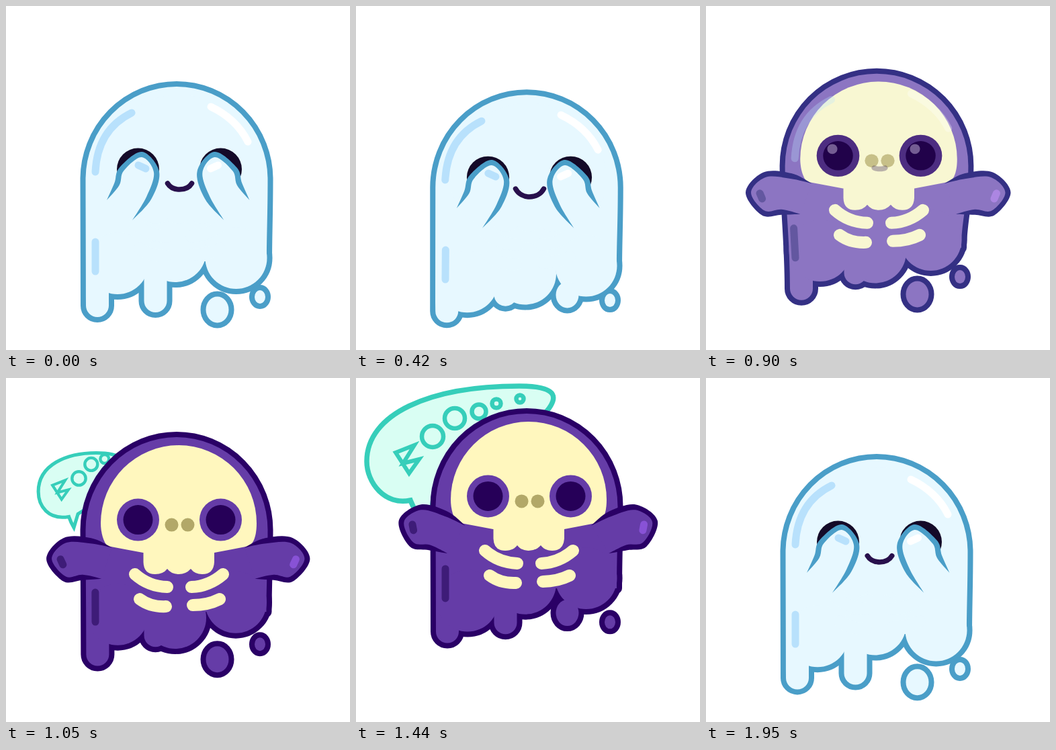
These frames come from a looping animation (512 by 512 pixels, 1980 ms). An HTML page:

```html
<!DOCTYPE html>
<html lang="en">
<head>
<meta charset="utf-8">
<title>Boo</title>
<style>
html, body { margin: 0; width: 100%; height: 100%; overflow: hidden; background: #fff; }
svg { display: block; width: 100vw; height: 100vh; }
</style>
</head>
<body>
<svg viewBox="0 0 512 512" fill="none" stroke-linecap="round">
  <defs>
    <g id="goo">
      <path id="dome"/>
      <circle id="hem1" r="46"/><circle id="hem2" r="46" cx="252"/><circle id="hem3" r="46"/>
      <rect id="leg2" x="205.500" y="350" width="34" rx="17"/>
      <ellipse id="drop1" cx="314.500" rx="17" ry="19.500"/><ellipse id="drop2" cx="378" rx="8" ry="10"/>
    </g>
  </defs>
  <g id="bubble" stroke="#36ceba">
    <path id="balloon" fill="#d9fef3" stroke-width="7.500"/>
    <path id="letterB" stroke-width="6" d="M-20-10L8-21-9 6 15 0 0 21Z"/>
    <g id="letters" stroke-width="6.500"></g>
  </g>
  <g id="ghost">
    <use id="outline" href="#goo" stroke-width="16" stroke-linejoin="round"/>
    <use id="skin" href="#goo"/>
    <path id="bar" stroke-width="11"/>
    <g class="stretch">
      <path class="bone" d="M141 248A116 116 0 0 1 373 248C373 268 368 278 362 282L310 292H204L151 282C145 276 141 262 141 248Z"/>
      <g id="gloss" stroke-width="11">
        <path stroke="#b8e1fc" d="M187 159Q136 184 133 247"/>
        <path stroke="#fff" d="M305 150Q343 168 360 202"/>
      </g>
    </g>
    <path class="bone" d="M310 284V306Q309 324 292 324 281 324 275 316 268 324 257 324 246 324 240 316 234 324 222 324 205 324 204.500 306V284Z"/>
    <path id="ribs" stroke-width="18" d="M192 324Q212 342 240 343M199 361Q215 373 238 372M323 324Q302 342 276 343M318 361Q300 370 278 370"/>
    <g id="face"></g>
    <path id="mouth" stroke="#28104c" stroke-width="7.500"/>
    <g class="stretch" id="arms"></g>
  </g>
</svg>
<script>
const LOOP = 1980;
const NS = "http://www.w3.org/2000/svg";
const $ = id => document.getElementById(id);
const set = (el, attrs) => { for (const k in attrs) el.setAttribute(k, attrs[k]); return el; };
const add = (parent, tag, attrs = {}) => set(parent.appendChild(document.createElementNS(NS, tag)), attrs);
const clamp = x => Math.max(0, Math.min(1, x));
const ramp = (t, a, b) => clamp((t - a) / (b - a));
const smooth = x => x * x * (3 - 2 * x);
const lerp = (a, b, k) => a + (b - a) * k;
const blend = (a, b, k) => a.map((v, i) => lerp(v, b[i], k));
const rgb = (a, b, k) => `rgb(${blend(a, b, k).map(Math.round)})`;

// Smooth pulse that peaks at the given time
const pulse = (t, peak, width) => Math.cos(Math.PI / 2 * Math.min(1, Math.abs(t - peak) / width)) ** 2;
// Wobble with a whole number of cycles per loop
const wave = (t, cycles, mid, amp) => mid + amp * Math.cos(2 * Math.PI * cycles * t / LOOP);

// Smooth curve through a few [time, value] keys, repeating every loop
function track(t, keys) {
  const n = keys.length;
  const key = i => {
    const turn = Math.floor(i / n), [time, value] = keys[i - turn * n];
    return [time + turn * LOOP, value];
  };
  let i = n - 1;
  while (keys[i][0] > t) i--;
  const [a, b, c, d] = [-1, 0, 1, 2].map(k => key(i + k));
  const h = c[0] - b[0], u = (t - b[0]) / h;
  const m0 = (c[1] - a[1]) / (c[0] - a[0]) * h, m1 = (d[1] - b[1]) / (d[0] - b[0]) * h;
  return lerp(b[1], c[1], smooth(u)) + u * (1 - u) * ((1 - u) * m0 - u * m1);
}
const lifts = [[0, 0], [420, 12], [660, 36], [900, -20], [1230, -41], [1440, -67], [1560, -66], [1680, -15], [1950, 1]];

// Cubic segments of a Catmull-Rom spline
function spline(pts, start = "M") {
  const tangent = i => {
    const a = pts[Math.max(0, i - 1)], b = pts[Math.min(pts.length - 1, i + 1)];
    return [(b[0] - a[0]) / 6, (b[1] - a[1]) / 6];
  };
  return start + pts[0] + pts.slice(1).map((q, i) => {
    const p = pts[i], s = tangent(i), e = tangent(i + 1);
    return `C${p[0] + s[0]} ${p[1] + s[1]} ${q[0] - e[0]} ${q[1] - e[1]} ${q}`;
  }).join("");
}

// Shift the inner points sideways, leaving both ends pointed
const offset = (pts, d) => pts.map((p, i) => {
  const a = pts[i - 1], b = pts[i + 1];
  if (!a || !b) return p;
  const dx = b[0] - a[0], dy = b[1] - a[1], len = Math.hypot(dx, dy);
  return [p[0] + dy / len * d, p[1] - dx / len * d];
});

const armHide = [[188, 319], [213, 285], [224, 247], [202, 221], [172, 243], [165, 265], [150, 289]];
const armOut = [[157, 284], [125, 275], [86, 276], [64, 304], [88, 333], [115, 330], [143, 331]];
const shineHide = [[197, 237], [208, 242]], shineOut = [[81, 304], [85, 312]];

const rings = [[114, 99, 16], [147, 72, 15], [183, 62, 10.5], [209, 50, 6.5], [244, 43, 5.5]];
const ringEls = rings.map(() => add($("letters"), "circle"));

const face = $("face");
const oval = (cx, cy, r, attrs) => ({ r, el: add(face, "ellipse", { cx, cy, ...attrs }) });
const sides = [196.5, 319.5];
const rims = sides.map(x => oval(x, 243, 31.5));
const pupils = sides.map(x => oval(x, 243, 22));
const glints = sides.map(x => oval(x - 8.5, 233, 7.5, { fill: "#e9defa" }));
const nostrils = [246.5, 270.5].map(x => oval(x, 250.5, 10, { fill: "#b2a868" }));

const arms = [0, 1].map(right => {
  const g = add($("arms"), "g", right ? { transform: "translate(512.5) scale(-1 1)" } : {});
  return { skin: add(g, "path"), edge: add(g, "path"), shine: add(g, "path", { "stroke-width": 11 }) };
});

function drawBubble(t) {
  const size = ramp(t, 990, 1080) * (1 - ramp(t, 1680, 1740));
  const big = smooth(ramp(t, 1080, 1210)) * (1 - ramp(t, 1620, 1680));
  const up = smooth(ramp(t, 1230, 1440)) * big;
  const mix = (a, b) => lerp(a, b, big);
  $("bubble").style.display = size ? "" : "none";
  set($("bubble"), { transform: `translate(101 224) scale(${size}) translate(-101 -224)` });

  const left = mix(23, 18), top = mix(58, 18), right = mix(212, 305), low = mix(198, 188), mid = mix(143, 130);
  set($("balloon"), {
    transform: `translate(${-2 * up} ${-6 * up})`,
    d: `M${mix(101, 112)} ${mix(222, 226)}Q${mix(94, 91)} 210 ${mix(90, 83)} ${low}
      C45 ${low + 8} ${left} ${mid + 32} ${left} ${mid}
      C${left} ${top + mix(26, 42)} ${mix(85, 110)} ${top} ${mix(150, 245)} ${top}
      C${right} ${top} ${right} ${top + 18} ${mix(211, 280)} ${top + 44}
      Q${mix(180, 225)} 150 ${mix(110, 118)} ${mix(192, 178)}Z`
  });
  set($("letterB"), { transform: `translate(${mix(74, 66) + 13 * up} ${mix(139, 127) - 6 * up})` });
  rings.forEach(([x, y, r], i) => set(ringEls[i], {
    cx: mix(112 + (x - 114) * .82, x),
    cy: mix(114 + (y - 99) * 1.15, y) - 12 * up,
    r: mix(i < 3 ? r - 1 : 0, r),
    opacity: i < 3 ? 1 : big
  }));
}

function drawArms(open, tilt, skin, line, shade, shine) {
  const angle = tilt * open * Math.PI / 180, c = Math.cos(angle), s = Math.sin(angle);
  const turn = ([x, y]) => [150 + (x - 150) * c - (y - 305) * s, 305 + (x - 150) * s + (y - 305) * c];
  const between = (a, b) => a.map((p, i) => turn(blend(p, b[i], open)));
  const mid = between(armHide, armOut), glow = between(shineHide, shineOut);
  const edge = spline(offset(mid, 4)) + spline(offset(mid, -4).reverse(), "L") + "Z";
  arms.forEach((arm, i) => {
    set(arm.skin, { d: spline(mid) + "Z", fill: skin });
    set(arm.edge, { d: edge, fill: line });
    set(arm.shine, { d: "M" + glow.join("L"), stroke: i ? shine : shade });
  });
}

function drawBody(t, q, flareL, flareR) {
  const rx = 135.5 / q, ry = 11 + 127 * q, foot = wave(t, 4, 458, 9) - 21;
  const l = 254 - rx, r = 254 + rx, footL = 119 - flareL, hemR = 388 + flareR;
  set($("dome"), {
    d: `M${l} 258A${rx} ${ry} 0 0 1 ${r} 258C${r} 310 ${hemR} 340 ${hemR} 380
      H${footL + 34}V${foot}a17 17 0 0 1 -34 0C${footL} 370 ${l} 310 ${l} 258Z`
  });
  set($("hem1"), { cx: 166 - flareL * .6, cy: wave(t, 2, 441, -8) - 50 });
  set($("hem2"), { cy: wave(t, 3, 428, -13) - 50 });
  set($("hem3"), { cx: 342.5 + flareR, cy: wave(t, 5, 419, 6) - 50 });
  set($("leg2"), { height: wave(t, 3, 447, 13) - 354 });
  set($("drop1"), { cy: wave(t, 2, 434, 18) });
  set($("drop2"), { cy: wave(t, 4, 416, 17) });
}

function draw(t) {
  const lift = track(t, lifts);
  const q = 1 - .04 * pulse(t, 680, 300) + .05 * pulse(t, 1680, 170);
  const flareL = 19 * pulse(t, 560, 160) - 6 * pulse(t, 900, 180) + 12 * pulse(t, 1680, 200);
  const flareR = -8 * pulse(t, 900, 180) + 2 * pulse(t, 1680, 200);
  const tilt = 4 * pulse(t, 900, 300) + 16 * smooth(ramp(t, 1230, 1440)) + 9 * ramp(t, 1560, 1680);
  const dark = ramp(t, 660, 1005) * (1 - ramp(t, 1590, 1770));
  const open = smooth(ramp(t, 570, 780)) * (1 - smooth(ramp(t, 1700, 1890)));

  const skin = rgb([231, 248, 255], [101, 60, 167], dark);
  const line = rgb([74, 158, 200], [42, 0, 102], dark);
  const shade = rgb([184, 225, 252], [62, 28, 120], dark);
  const bone = rgb([231, 248, 255], [255, 247, 190], dark);

  set($("ghost"), { transform: `translate(0 ${lift})` });
  set($("outline"), { stroke: line, fill: line });
  set($("skin"), { fill: skin });
  drawBody(t, q, flareL, flareR);
  set($("bar"), { d: `M${133 + flareL * .4} 351L133 395`, stroke: shade });

  document.querySelectorAll(".stretch").forEach(g =>
    set(g, { transform: `translate(256 243) scale(${1 / q} ${q}) translate(-256 -243)` }));
  document.querySelectorAll(".bone").forEach(el => set(el, { fill: bone }));
  set($("ribs"), { stroke: bone });
  set($("gloss"), { opacity: 1 - dark });

  const squeeze = q ** 1.7;
  [rims, pupils, glints, nostrils].flat().forEach(({ r, el }) => set(el, { rx: r / squeeze, ry: r * squeeze }));
  rims.forEach(({ el }) => set(el, { fill: rgb([20, 10, 40], [101, 60, 167], dark) }));
  pupils.forEach(({ el }) => set(el, { fill: rgb([20, 8, 42], [38, 0, 88], dark) }));
  glints.forEach(({ el }) => set(el, { opacity: .85 * open * (1 - dark) ** .6 }));
  nostrils.forEach(({ el }) => set(el, { opacity: dark }));

  const grin = clamp(lift / 12) * (1 - dark);
  const half = 18 + 3 * grin - 14 * dark, y = 264 - 4 * grin - 4 * dark;
  const low = y + (12 + 4 * grin) * (1 - dark) ** 1.5;
  set($("mouth"), {
    d: `M${258.5 - half} ${y}C${258.5 - half * .6} ${low} ${258.5 + half * .6} ${low} ${258.5 + half} ${y}`,
    opacity: 1 - dark
  });

  drawArms(open, tilt, skin, line, shade, rgb([255, 255, 255], [136, 82, 214], dark));
  drawBubble(t);
}

const start = performance.now();
function tick() {
  draw((performance.now() - start) % LOOP);
  requestAnimationFrame(tick);
}
tick();
</script>
</body>
</html>
```
